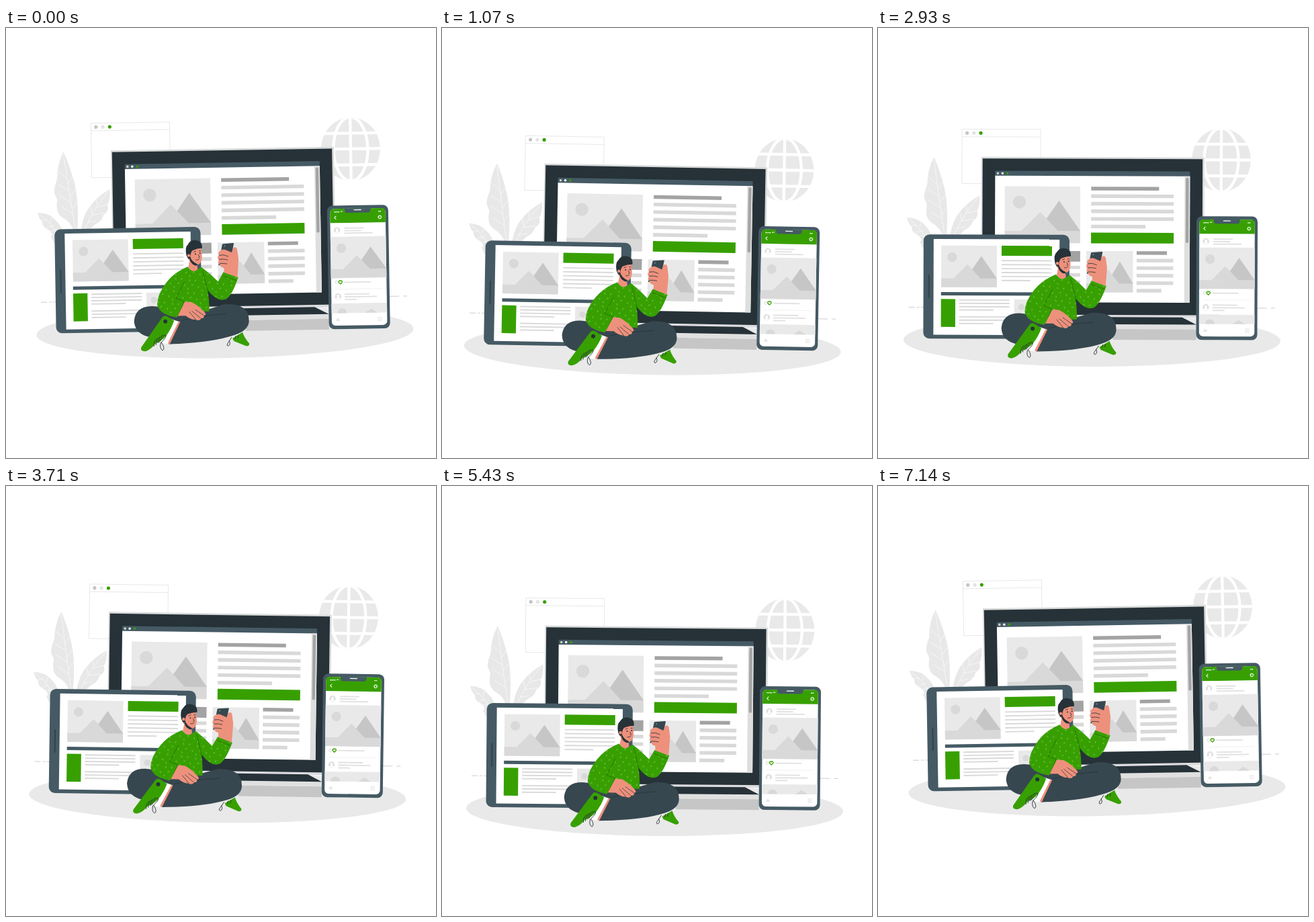
Animation of 640 by 640 pixels, one loop 7210 ms. Source, as an HTML page:

```html
<!DOCTYPE html>
<html lang="en">
<head>
<meta charset="utf-8">
<title>Responsive devices</title>
<style>
html, body { margin: 0; width: 100%; height: 100%; overflow: hidden; background: #fff; }
svg { display: block; width: 100vw; height: 100vh; }
</style>
</head>
<body>
<svg viewBox="0 0 640 640">
  <defs>
    <pattern id="flecks" width="21" height="19" patternUnits="userSpaceOnUse" patternTransform="rotate(8)">
      <path d="M3 4l1.6.8M13 3l-.5 1.4M8 11l1.5-.6M18 12l.4 1.4M3 16.500l.7 1.3" stroke="#b5dd98" stroke-width=".75" stroke-linecap="round"/>
    </pattern>
    <path id="sweater" d="M265 367Q274 378 285 368Q294 374 310 390L318 376L340 384Q331 410 322 416Q309 422 294 402Q297 417 296 434H255L247 442Q223 438 219 424Q218 409 233 390Q245 375 265 367Z"/>
    <clipPath id="globeClip"><ellipse cx="510.5" cy="196" rx="44" ry="47"/></clipPath>
  </defs>
  <g id="scene">
    <g id="backdrop">
      <ellipse cx="319" cy="465" rx="280.5" ry="39" fill="#e9e9e9"/>
      <path d="M46 416.5h9M58 416.5h4M64 416.5h6M564 416.2h15M585 416.2h6" stroke="#b9b9b9" stroke-width=".7"/>
      <g fill="#fff" stroke="#e6e6e6" stroke-width=".9">
        <rect x="124.6" y="151.3" width="117" height="81"/>
        <path d="M124.6 162.5h117"/>
      </g>
      <circle cx="132" cy="157" r="2.6" fill="#c4c4c4"/>
      <circle cx="142.2" cy="157" r="2.6" fill="#e3e3e3"/>
      <circle cx="152.5" cy="157" r="2.6" fill="#37a000"/>
      <g clip-path="url(#globeClip)" fill="none" stroke="#fff" stroke-width="4.3">
        <rect x="466" y="149" width="89" height="95" fill="#e9e9e9" stroke="none"/>
        <path d="M510.5 148v96M466 172.4h89M466 195.8h89M466 219.6h89"/>
        <ellipse cx="510.5" cy="196" rx="25.5" ry="47.5"/>
      </g>
      <g fill="#e8e8e8">
        <path d="M83 193Q92 214 98 237Q105 264 102 309H96Q91 297 80 291Q70 285 72 269Q74 264 69 256Q67 249 73 234Q73 212 83 193Z"/>
        <path d="M151 250Q152 266 147 273Q151 281 141 288Q139 297 128 302L120 310H107Q111 286 122 274Q133 260 151 250Z"/>
        <path d="M43 283Q61 284 69 294Q77 301 80 312L78 328H66Q64 321 62 319Q68 317 59 309Q49 304 50 297Q44 290 43 283Z"/>
      </g>
      <path d="M83 197Q90 250 99 309M87 233l-12-11M90 251l-16-10M92 268l-17-11M95 285l-16-10M89 240l7-10M92 260l8-11M95 278l7-10
        M150 252Q127 277 113 309M132 273l-1-8M124 285l-2-10M130 277l17-5M123 288l20-3M117 299l13-2
        M45 285Q66 300 75 322M58 294l-9 1M66 303l-10 2M62 298l2-7M70 309l-9 3" fill="none" stroke="#fff" stroke-width=".6"/>
    </g>

    <g id="monitor">
      <path d="M350 448h124v16H350z" fill="#c6c6c6"/>
      <path d="M350 440h124v8H350z" fill="#e0e0e0"/>
      <path d="M345 426h129v5H345z" fill="#dcdce0"/>
      <path d="M345 430.3H453L474 441H345Z" fill="#263238"/>
      <path d="M153.5 192.3H485.3V427H153.5Z" fill="#d8dad9"/>
      <path d="M155.3 194.8H482.7V427H155.3Z" fill="#263238"/>
      <path d="M174 213h290v8H174z" fill="#455a64"/>
      <path d="M174 220.4h290v188.2H174z" fill="#fff"/>
      <circle cx="178" cy="216.8" r="1.8" fill="#d0d0d0"/>
      <circle cx="185" cy="216.8" r="1.8" fill="#fff"/>
      <circle cx="192.3" cy="216.8" r="1.8" fill="#37a000"/>
      <path d="M456 220.4h8v188.2h-8z" fill="#dedede"/>
      <rect x="457.8" y="222.5" width="4.4" height="97" rx="2" fill="#a4a4a4"/>
    </g>
    <g id="monitorPage"></g>

    <g id="tablet">
      <rect x="67.8" y="308.1" width="217.2" height="155" rx="9" fill="#455a64"/>
      <path d="M82.8 314.8h187.4v142.7H82.8z" fill="#fff"/>
      <path d="M76 369v33" stroke="#33434b" stroke-width="2" stroke-linecap="round"/>
    </g>
    <g id="tabletPage"></g>

    <g id="phone" transform="translate(.2 -.7)">
      <rect x="473.7" y="280.5" width="91" height="184" rx="8" fill="#455a64"/>
      <rect x="478" y="285.3" width="82.5" height="174" rx="6" fill="#fff"/>
      <path d="M478 306.4V291.3Q478 285.3 484 285.3H554.5Q560.5 285.3 560.5 291.3V306.4Z" fill="#37a000"/>
      <path d="M498 285h42q-2 0-2 3t-3 3.5h-32q-3 0-3-3.5t-2-3z" fill="#455a64"/>
      <path d="M514 287.3h10" stroke="#fff" stroke-width="1.3" stroke-linecap="round"/>
      <path d="M484 290h8M494 289.5h3M550 290h4.5" stroke="#fff" stroke-width="1.4" stroke-dasharray="1.6 .6"/>
      <path d="M487 296l-2.5 2.5 2.5 2.5" fill="none" stroke="#fff"/>
      <circle cx="552" cy="298.7" r="2" fill="none" stroke="#fff"/>
      <circle cx="552" cy="298.7" r="2.8" fill="none" stroke="#fff" stroke-width=".7" stroke-dasharray="1 1.2"/>
      <path d="M484 405h70" stroke="#eee" stroke-width=".8"/>
      <circle cx="486" cy="394.7" r="2" fill="none" stroke="#ddd"/>
      <path d="M491.8 397.3q-4-2.7-2-4.7q1.2-.8 2 .4q.8-1.2 2-.4q2 2-2 4.7z" fill="none" stroke="#37a000" stroke-width="1.3"/>
      <path d="M484.7 450.5l2.5-2.7 2.5 2.7v2h-5z" fill="#e6e6e6"/>
      <path d="M546 448h7M546 450.3h7M546 452.6h7" stroke="#dcdcdc" stroke-width=".8"/>
    </g>
    <g id="phonePage"></g>

    <g id="reader">
      <path d="M330 475L345 466Q348 475 355 483Q355 487 350 486.5L332 479Z" fill="#37a000"/>
      <path d="M184 447Q186 425 211 425Q260 430 295 431L318 424Q355 422 355 449Q355 463 333 470Q299 481 235 482L230 472H212Q185 468 184 447Z" fill="#37474f"/>
      <path d="M255 447Q276 441 321 438" fill="none" stroke="#263238" stroke-width=".8"/>
      <path d="M240 445L252 449L236 482L222 480Z" fill="#fff"/>
      <path d="M250 448.5L252.5 449.5L236.5 482L233.5 480.5Z" fill="#ed917d"/>
      <path d="M194 486L226 442Q229 438 234 441L243.5 447Q240 458 231 470Q226 476 215 481Q208 490 200 492Q192 492 194 486Z" fill="#37a000"/>
      <circle cx="230.5" cy="448" r="3" fill="#263238"/>
      <g fill="none" stroke="#263238" stroke-width=".9">
        <path d="M213 485q-1-8 5-12M216 483q0-8 6-12M219 480q1-8 8-12M221 479q4-9 9-11q4 2-7 12q-2 9 3 11q4-3-2-12"/>
        <path d="M329 473l-4 6q-5 6-2 7q5-1 2-8M335 471l-1 5M339 470l-1 5"/>
      </g>
      <path d="M289 384L303 411L295 414Z" fill="#263238"/>
      <use href="#sweater" fill="#37a000"/>
      <use href="#sweater" fill="url(#flecks)"/>
      <path d="M247 414L260 389M247 414L260 419M249 441L259 419M287 373Q291 389 295 405M316 381L338 389" fill="none" stroke="#246b00" stroke-width=".8"/>
      <path d="M249 440L260 419L270 420Q280 425 289 435Q293 440 288 440Q289 445 284 444Q282 449 275 446Q268 446 261 440Z" fill="#ed917d"/>
      <path d="M275 431l13 9M270 433l13 11M266 434l10 12" fill="none" stroke="#263238" stroke-width=".7"/>

      <path d="M266 342L284 337Q288 350 286 357Q285 364 279 364.500L280 371Q273 378 266 368L268 358Q263 354 266 345Z" fill="#ed917d"/>
      <path d="M263.500 350Q261 338 266 334Q270 327 277 328Q288 329 287 340Q280 340 273 343Q270 345 269.500 351L267 356Q265 354 263.500 350Z" fill="#263238"/>
      <path d="M267.500 353L269 352Q271 360 279.500 363.500Q280 366 276 365.500Q269 363 267.500 353Z" fill="#263238"/>
      <circle cx="267" cy="350.500" r="2.200" fill="#ed917d"/>
      <circle cx="277" cy="348.500" r="1" fill="#263238"/>
      <circle cx="283.700" cy="347.500" r="1" fill="#263238"/>
      <path d="M274 345.500l4-1.500M282 344h3M281 349l2 4-2 .7M277 357q4 1.200 6-2" fill="none" stroke="#263238" stroke-width=".8"/>

      <path d="M317 335Q317 334 319 334L333 333Q335 333 334 335L329 361L311 366Z" fill="#37474f"/>
      <circle cx="320.500" cy="337.300" r="1" fill="#78909c"/>
      <path d="M313 345Q317 341 322 343L331 347L333 341Q337 337 339 342L341 357L339 384L319 376.500L319 370Q313 369 313 364Q309 362 312 358Q308 354 312 351Q310 347 313 345Z" fill="#ed917d"/>
      <path d="M312 351q7-2 14 2M312 357q8-1 13 1M313 363q7 0 11 1" fill="none" stroke="#263238" stroke-width=".8"/>
    </g>
  </g>
</svg>
<script>
const GREEN = '#37a000', SLATE = '#455a64', HEAD = '#a3a3a3', LINE = '#d9d9d9', PALE = '#e9e9e9', SOFT = '#e0e0e0';

const bar = (x, y, w, h, fill = LINE) =>
  `<rect x="${x}" y="${y}" width="${w}" height="${h}" fill="${fill}"/>`;
const rows = (x, y, step, h, widths, fill) =>
  widths.map((w, i) => bar(x, y + i * step, w, h, fill)).join('');
const disc = (x, y, r, fill = LINE) =>
  `<circle cx="${x}" cy="${y}" r="${r}" fill="${fill}"/>`;

// Placeholder picture: sun, two mountains and a strip of ground.
function picture(x, y, w, h) {
  const shape = (fill, ...points) =>
    `<polygon fill="${fill}" points="${points.map(([u, v]) => [x + u * w, y + v * h]).join(' ')}"/>`;
  return bar(x, y, w, h, PALE)
    + disc(x + .195 * w, y + .28 * h, .086 * w)
    + shape('#c6c6c6', [.44, .79], [.72, .25], [1, .78], [1, .8])
    + shape(LINE, [.22, .79], [.47, .45], [.71, .79])
    + shape(LINE, [0, .785], [1, .785], [1, 1], [0, 1]);
}

const avatar = (x, y) => disc(x, y, 4.7, '#dedede') + disc(x, y - 1, 1.9, '#fff')
  + `<path d="M${x - 3} ${y + 4}q0-3.5 3-3.5t3 3.5z" fill="#fff"/>`;

const fill = (id, ...parts) => { document.getElementById(id).innerHTML = parts.join(''); };

fill('monitorPage',
  picture(188.4, 236, 112.4, 84.4),
  bar(317, 236.3, 101, 5.5, HEAD),
  rows(317, 247.6, 11.3, 5.4, [123, 123, 123, 123, 81]),
  bar(317, 304.7, 123, 15.8, GREEN),
  picture(310, 332, 69.5, 61.5),
  bar(385, 332, 45, 5.4, HEAD),
  rows(385, 343.3, 11.2, 5.4, [54.5, 54.5, 54.5, 54.5, 37]),
  bar(215, 332, 86, 16, HEAD),
  rows(215, 353.5, 11.2, 5.4, [86, 86, 86, 60]));

fill('tabletPage',
  picture(94.3, 324.6, 82.7, 62),
  bar(184, 324.5, 75, 15, GREEN),
  rows(184, 345.9, 5.9, 1.9, [75, 75, 75, 75, 75, 43]),
  bar(94, 393.8, 170, 5, SLATE),
  bar(94, 404.2, 21.3, 41.5, GREEN),
  rows(121, 404.7, 4.9, 1.9, [75, 75, 75, 51]),
  rows(121, 429.7, 4.9, 1.9, [75, 75, 51]),
  picture(203, 404.5, 56, 41));

fill('phonePage',
  avatar(488.2, 317),
  rows(499, 312.8, 3.7, 1.8, [29, 25, 42], SOFT),
  picture(478.2, 326.3, 82.5, 61.5),
  bar(498, 393.3, 39, 1.7, SOFT),
  avatar(488.2, 415.3),
  rows(498, 411, 4, 1.8, [37, 48, 18], SOFT),
  bar(478.2, 425.6, 82.5, 14.5, PALE),
  `<path d="M487 440a7 7 0 0 1 14 0zM528 440l9-6 10 6z" fill="${LINE}"/>`);

const scene = document.getElementById('scene');
const LOOP = 7210, STEP = 71.4, STEPS = 100, TAU = 2 * Math.PI;

// Three sways and two bobs per loop, drawn at fourteen steps a second.
function draw() {
  const time = performance.now() % LOOP;
  const phase = Math.min(STEPS, Math.floor((time + 5) / STEP)) / STEPS;
  const tilt = -Math.cos(TAU * (3 * phase + .051));
  const lift = 10.85 * (1 - Math.cos(TAU * 2 * phase));
  scene.setAttribute('transform',
    `translate(0 ${lift.toFixed(3)}) rotate(${tilt.toFixed(4)} 0 85) translate(.8 -7.4)`);
  requestAnimationFrame(draw);
}
draw();
</script>
</body>
</html>
```
